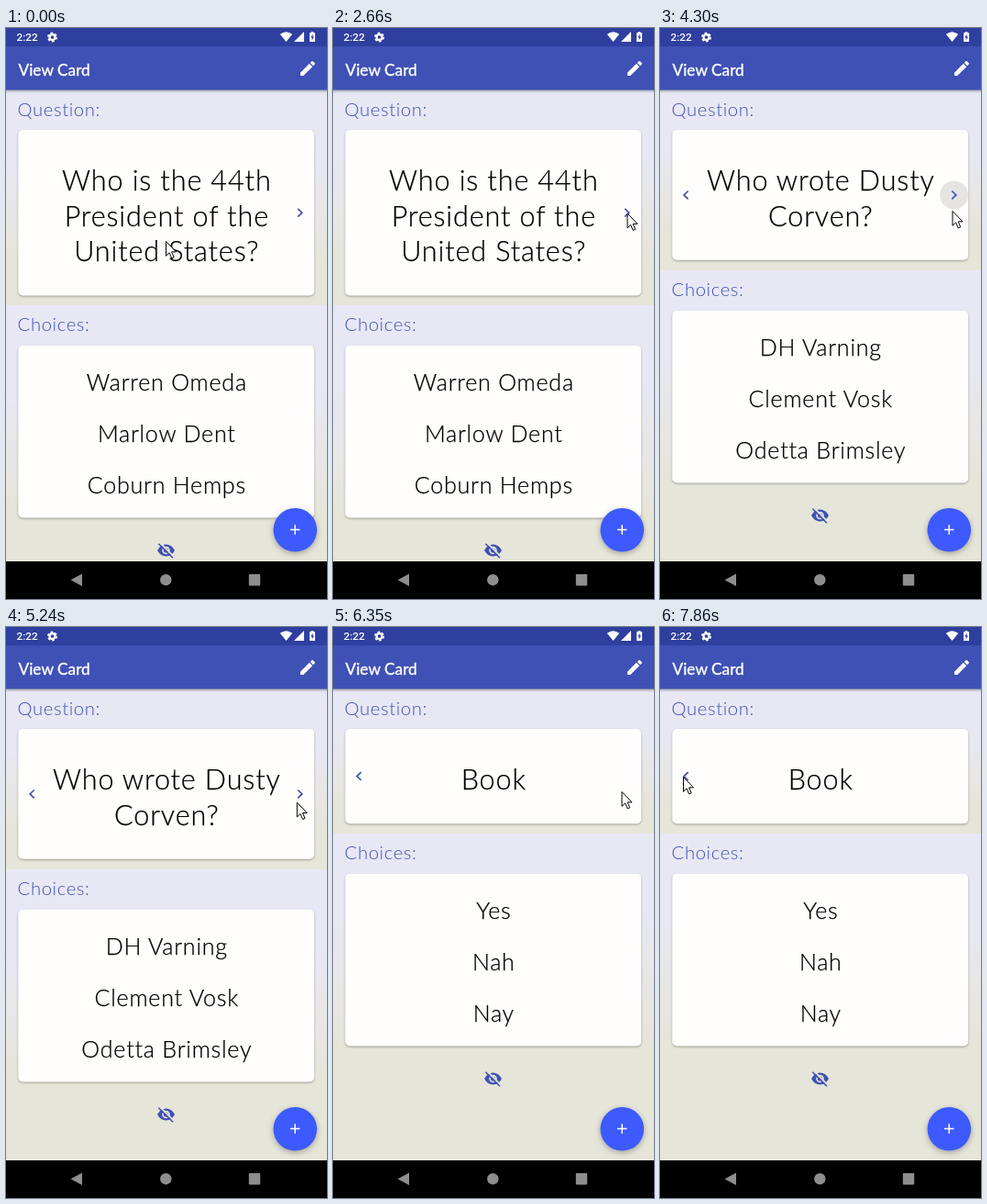
Recreate the animation shown at these times as an HTML page. Size 350 px wide and 622 px high, loop 8000 ms.

```html
<!DOCTYPE html>
<html lang="en">
<head>
<meta charset="utf-8">
<title>View Card</title>
<style>
  html, body { margin: 0; width: 100%; height: 100%; overflow: hidden; background: #000; }
  svg { display: block; width: 100%; height: 100%; }
  text { font-family: Lato, sans-serif; }
  .heading { font-size: 20.3px; font-weight: 300; letter-spacing: .6px; fill: #3f51b5; }
  .question, .choice { font-weight: 300; text-anchor: middle; stroke: #000; stroke-width: .25px; }
  .question { font-size: 30.5px; letter-spacing: .9px; }
  .choice { font-size: 25px; letter-spacing: .8px; }
  .card { fill: #fffefc; filter: drop-shadow(0 1px 1.2px rgba(0, 0, 0, .32)); }
  .chevron { fill: none; stroke: #3f51b5; stroke-width: 1.7; }
  .fab { fill: #3d5afe; filter: drop-shadow(0 2.5px 3px rgba(0, 0, 0, .3)); }
</style>
</head>
<body>
<svg viewBox="0 0 350 622">
  <defs>
    <linearGradient id="sky" x2="0" y2="1">
      <stop offset=".3" stop-color="#e8e8f5"/>
      <stop offset=".8" stop-color="#e6e5d9"/>
    </linearGradient>
    <linearGradient id="shade" x2="0" y2="1">
      <stop stop-opacity=".3"/>
      <stop offset="1" stop-opacity="0"/>
    </linearGradient>
  </defs>
  <rect width="350" height="622" fill="#e6e5d9"/>
  <g id="pages"></g>

  <circle class="fab" cx="315.3" cy="546.8" r="23.8"/>
  <path d="M310 546.5h10.4M315.2 541.3v10.4" stroke="#fff" stroke-width="1.5"/>

  <rect y="67" width="350" height="4" fill="url(#shade)"/>
  <rect y="20" width="350" height="47.5" fill="#3f51b5"/>
  <rect width="350" height="20" fill="#2f3f9f"/>
  <text x="13.5" y="51.5" font-size="17.3" fill="#fff" stroke="#fff" stroke-width=".35">View Card</text>
  <path transform="translate(318.3 33.3) scale(.89)" fill="#fff"
    d="M3 17.25V21h3.75L17.8 9.95 14.05 6.2zM20.7 7.05q.6-.7 0-1.4l-2.35-2.35q-.7-.6-1.4 0l-1.85 1.85 3.75 3.75z"/>

  <text x="11.5" y="14" font-size="11.8" font-weight="500" fill="#fff" style="font-family:Roboto,sans-serif">2:22</text>
  <g fill="none" stroke="#fff">
    <circle cx="50.5" cy="10" r="3" stroke-width="2.3"/>
    <circle cx="50.5" cy="10" r="4.7" stroke-width="1.6" stroke-dasharray="2.6 2.32"/>
  </g>
  <path id="wifi" fill="#fff" d="M0 15-6.7 6.8Q0 1.6 6.7 6.8z"/>
  <path id="signal" fill="#fff" d="M314 15h11V4z"/>
  <path fill="#fff" d="M331 5.2h1.7V4h2.6v1.2h1.7V15h-6z"/>
  <path fill="#2f3f9f" d="M334.6 6.4 332.3 10.6h1.4v3l2.2-4.2h-1.3z"/>

  <rect y="581" width="350" height="41"/>
  <g fill="#8e8e8e">
    <path d="M70.5 601.3 83 594.5v13.6z"/>
    <circle cx="174.3" cy="601.2" r="6.2"/>
    <rect x="264.8" y="595" width="12.4" height="12.4" rx=".8"/>
  </g>

  <circle id="press" r="11" opacity=".05"/>
  <path id="cursor" fill="#fff" stroke="#000" d="M.5.5v15.8l3.6-3.4 2.6 6 2.5-1.1-2.6-5.9h4.9z"/>
</svg>
<script>
const LOOP = 8000;
const STEP = 135; // the screen refreshes in steps of this many ms
const $ = id => document.getElementById(id);

const cards = [
  { start: 0, question: ["Who is the 44th", "President of the", "United States?"],
    choices: ["Warren Omeda", "Marlow Dent", "Coburn Hemps"] },
  { start: 4300, question: ["Who wrote Dusty", "Corven?"],
    choices: ["DH Varning", "Clement Vosk", "Odetta Brimsley"] },
  { start: 6350, question: ["Book"], choices: ["Yes", "Nah", "Nay"] },
];

// The pointer rests between glides; sag bends the path downwards.
const glides = [
  { start: 860, steps: 2, x: 141, y: 280, sag: 0 },
  { start: 1850, steps: 7, x: 320.5, y: 201.5, sag: 10 },
  { start: 3220, steps: 2, x: 318.5, y: 199, sag: 0 },
  { start: 5120, steps: 7, x: 314.5, y: 179, sag: 0 },
  { start: 6910, steps: 8, x: 25, y: 163, sag: 42 },
];
const presses = [3760, 6080];
const signalLosses = [[150, 300], [860, 980], [3620, 3760], [3880, 4570], [7340, 7460], [7860, LOOP]];

const section = (y, height, title) =>
  `<rect y="${y}" width="350" height="${height}" fill="url(#sky)"/>
   <text class="heading" x="12.6" y="${y + 28.3}">${title}</text>`;
const cardBox = (y, height) =>
  `<rect class="card" x="13.3" y="${y}" width="322.8" height="${height}" rx="5"/>`;
const lines = (kind, list, y, step) => list.map((line, i) =>
  `<text class="${kind}" x="175.3" y="${y + i * step}">${line}</text>`).join("");
const chevron = (x, y, side) =>
  `<path class="chevron" d="M${x - 2.4 * side} ${y - 4.4}l${4.6 * side} 4.4 ${-4.6 * side} 4.4"/>`;
const hiddenEye = y =>
  `<g transform="translate(174.5 ${y})" fill="#3f51b5">
     <path d="M-9.5 0Q-6-6.5 0-6.5T9.5 0Q6 6.5 0 6.5T-9.5 0"/>
     <circle r="4.3" fill="#e6e5d9"/><circle r="2.6"/>
     <path d="M-7-8.6 9 7.4" stroke="#e6e5d9" stroke-width="1.8"/>
     <path d="M-8.2-7.3 7.4 8.3" stroke="#3f51b5" stroke-width="1.6"/>
   </g>`;

function page({ question, choices }, index) {
  const hasPrevious = index > 0;
  const hasNext = index < cards.length - 1;
  const textHeight = 38.6 * question.length;
  const cardHeight = 64.6 + textHeight;
  const middle = 111 + cardHeight / 2;
  const split = Math.round(186.3 + textHeight);
  return `<g>
    ${section(68, split - 68, "Question:")}
    ${cardBox(111, cardHeight)}
    ${lines("question", question, 177, 38.6)}
    ${hasPrevious ? chevron(28.3, middle, -1) : ""}
    ${hasNext ? `<circle class="ripple" cx="320.6" cy="${middle}" r="15.5" opacity=".1"/>` : ""}
    ${hasNext ? chevron(320.6, middle, 1) : ""}
    ${section(split, 287, "Choices:")}
    ${cardBox(split + 43.8, 187.6)}
    ${lines("choice", choices, split + 93, 55.8)}
    ${hiddenEye(split + 267)}
  </g>`;
}
$("pages").innerHTML = cards.map(page).join("");
const pages = [...$("pages").children];

const within = (time, start, end) => time >= start && time < end;
const show = (element, visible) => element.setAttribute("display", visible ? "inline" : "none");
const move = (id, x, y) => $(id).setAttribute("transform", `translate(${x} ${y})`);

function pointerAt(time) {
  let x = 174, y = 232;
  for (const glide of glides) {
    if (time < glide.start) break;
    const step = Math.floor((time - glide.start) / STEP) + 1;
    const eased = 1 - (1 - Math.min(step / glide.steps, 1)) ** 3.5;
    x += (glide.x - x) * eased;
    y += (glide.y - y) * eased + glide.sag * Math.sin(Math.PI * eased);
  }
  return [x, y];
}

function draw(time) {
  const current = cards.findLastIndex(card => card.start <= time);
  pages.forEach((group, i) => show(group, i === current));

  const ripple = pages[current].querySelector(".ripple");
  const opened = cards[current].start;
  if (ripple) show(ripple, current > 0 && time < opened + STEP);

  const [x, y] = pointerAt(time);
  move("cursor", x, y);
  move("press", x + 1, y + 1);
  show($("press"), presses.some(start => within(time, start, start + STEP)));

  const lost = signalLosses.some(([start, end]) => within(time, start, end));
  move("wifi", lost ? 318.5 : 305.5, 0);
  show($("signal"), !lost);
}

const begin = performance.now();
function tick() {
  draw((performance.now() - begin) % LOOP);
  requestAnimationFrame(tick);
}
tick();
</script>
</body>
</html>
```
